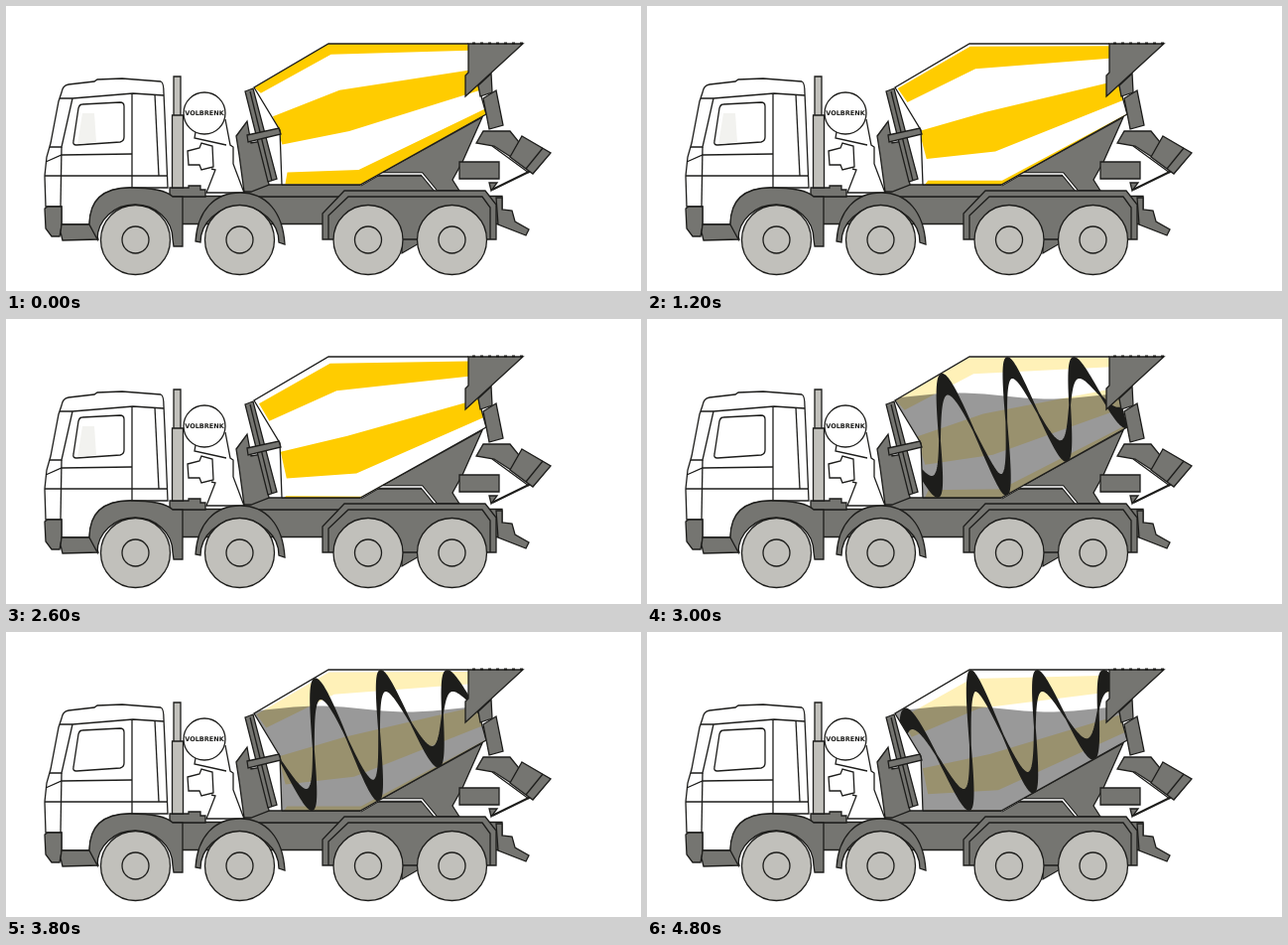
An HTML page with a canvas that plays this animation: 640 by 287 pixels, repeating every 5000 ms.

```html
<!DOCTYPE html>
<html lang="en">
<head>
<meta charset="utf-8">
<title>Concrete mixer</title>
<style>
html, body { margin: 0; width: 100%; height: 100%; overflow: hidden; background: #fff; }
canvas { display: block; }
</style>
</head>
<body>
<canvas id="stage" width="640" height="287"></canvas>
<script>
const ctx = document.getElementById('stage').getContext('2d');
const INK = '#1d1d1b', DARK = '#757571', LIGHT = '#c1c0bb', YELLOW = '#ffcc00', WHITE = '#fff';
const STEP = 200, STEPS = 25, CUT = 15;   // the drum is cut open from step CUT on
const STRIPES = 5, PITCH = 67;            // stripes around the drum, screw pitch

const lerp = (a, b, k) => a + (b - a) * k;
const clamp = (v, lo, hi) => Math.min(hi, Math.max(lo, v));

function paint(fill, width = 1.3) {
  if (fill) { ctx.fillStyle = fill; ctx.fill(); }
  if (width) { ctx.lineWidth = width; ctx.strokeStyle = INK; ctx.stroke(); }
}

function trace(points, close) {
  ctx.beginPath();
  for (let i = 0; i < points.length; i += 2) ctx.lineTo(points[i], points[i + 1]);
  if (close) ctx.closePath();
}

function poly(fill, points, width) { trace(points, true); paint(fill, width); }
function line(points, width) { trace(points, false); paint(null, width); }
function box(fill, x, y, w, h) { ctx.beginPath(); ctx.rect(x, y, w, h); paint(fill); }
function disc(x, y, r, fill) { ctx.beginPath(); ctx.arc(x, y, r, 0, 7); paint(fill); }
function shape(fill, d) {
  const p = new Path2D(d);
  ctx.fillStyle = fill;
  ctx.fill(p);
  ctx.lineWidth = 1.3;
  ctx.strokeStyle = INK;
  ctx.stroke(p);
}

// Point on the drum: u runs along its top, f goes from top (0) to bottom (1).
function drumPoint(u, f) {
  const front = u < 325, k = front ? (u - 250) / 75 : (u - 325) / 140;
  const top = front ? lerp(82, 38, k) : 38;
  const bottomX = front ? lerp(280, 359, k) : lerp(359, 486, k);
  const bottom = front ? 180 : lerp(180, 109, k);
  return [lerp(u, bottomX, f), lerp(top, bottom, f), (bottom - top) / 2];
}

const onDrum = (u, angle) => drumPoint(u, (1 - Math.cos(angle)) / 2);

// Stripes climb the visible half of the drum as it turns, slightly twisted.
function stripeEdge(angle) {
  return [250, 325, 465].map((u, i) => {
    const a = clamp(angle + (i - 1) * .07, 0, Math.PI);
    const [x, y] = onDrum(u, a);
    return [x + (i ? 0 : 11 * Math.sin(a)), y];
  });
}

function stripes(phase) {
  ctx.fillStyle = YELLOW;
  for (let n = -1; n < 3; n++) {
    const angle = 2.48 - (phase + n) * 2 * Math.PI / STRIPES;
    trace([...stripeEdge(angle), ...stripeEdge(angle + .59).reverse()].flat(), true);
    ctx.fill();
  }
}

function concrete() {
  ctx.beginPath();
  for (let x = 245; x <= 490; x += 5) ctx.lineTo(x, 77.5 - 3 * Math.cos((x - 315) * Math.PI / 90));
  ctx.lineTo(490, 190);
  ctx.lineTo(245, 190);
  ctx.globalCompositeOperation = 'multiply';
  ctx.fillStyle = '#999';
  ctx.fill();
  ctx.globalCompositeOperation = 'source-over';
}

function bladePoint(u, peak, depth) {
  const half = drumPoint(u, 0)[2];
  const swing = Math.cos((u - peak) / PITCH * 2 * Math.PI) * (1 - depth / half);
  return drumPoint(u, (1 - swing) / 2).slice(0, 2);
}

function blade(peak) {
  const outer = [], inner = [];
  for (let u = 250; u <= 466; u++) {
    outer.push(bladePoint(u, peak, 1));
    inner.unshift(bladePoint(u, peak, 21));
  }
  ctx.lineJoin = 'round';
  poly(INK, outer.concat(inner).flat(), 1.8);
  ctx.lineJoin = 'miter';
}

function drum(step) {
  const open = step >= CUT, k = step - CUT;
  const turn = .297 * k - .0045 * k * k;
  const phase = open ? (3.875 - turn) % 1 : (step % 8) / 8;

  ctx.save();
  trace([250, 82, 325, 38, 466, 38, 466, 75, 476, 80, 484, 109, 357, 180, 278, 180, 276, 125], true);
  ctx.clip();
  ctx.fillStyle = WHITE;
  ctx.fillRect(240, 30, 260, 160);
  ctx.globalAlpha = open ? .28 : 1;
  stripes(phase);
  ctx.globalAlpha = 1;
  if (open) {
    concrete();
    blade(296 + 13 * turn);
  }
  ctx.restore();
  line([278, 180, 276, 125, 250, 82, 325, 38, 466, 38]);
  line([278, 180, 357, 180, 484, 109, 476, 80]);
}

function wheel(x) {
  disc(x, 235.5, 35, LIGHT);
  disc(x, 235.5, 13.5, LIGHT);
}

function chassis() {
  box(DARK, 165, 191.5, 335, 28);
  poly(DARK, [165, 183, 184, 183, 184, 181, 196, 181, 196, 185, 201, 185, 201, 192, 165, 192]);
  poly(DARK, [240, 180, 357, 180, 372, 171, 420, 171, 433, 187, 433, 192, 240, 192]);
  poly(DARK, [494, 193, 500, 193, 500, 205, 510, 206, 513, 217, 527, 225, 524, 231, 496, 220]);
}

function rearStand() {
  poly(DARK, [357, 180, 480, 112, 460, 157, 450, 175, 457, 186, 433, 186, 420, 169, 378, 169]);
  box(DARK, 457, 157, 40, 17);
  line([357, 180, 376, 169, 419, 169, 433, 186], 3.6);
  ctx.strokeStyle = WHITE;
  ctx.lineWidth = 1.5;
  ctx.stroke();
}

function rearFender() {
  poly(DARK, [398, 215, 418, 215, 418, 238, 399, 249]);
  poly(DARK, [319, 235, 319, 209, 341, 186, 483, 186, 494, 200, 494, 235]);
  line([325, 235, 325, 211, 345, 192, 480, 192, 488, 203, 488, 235]);
}

function frontFenders() {
  shape(DARK, 'M84 220C84 195 98 183 125 183C150 183 163 187 168 192H178V242H169L168 235A38 35 0 0 0 92 235Z');
  shape(DARK, 'M191 237C193 206 210 188 236 188C262 188 279 207 281 240L275 238A39.5 36 0 0 0 196 238Z');
}

function cab(open) {
  shape(WHITE, 'M56 87Q57 80 63 79L89 76L92 74L117 73L156 76Q159 77 159 88L160 110L163 183H125C98 183 85 197 84 220H56V202H40L39 171L41 152L45 138L53 96Z');
  line([54, 93, 67, 93, 128, 88, 159, 90]);
  line([67, 93, 56, 142, 44, 142]);
  line([40, 157, 56, 150, 127, 149]);
  line([56, 142, 55, 202]);
  line([39, 171, 162, 171]);
  line([127, 89, 127, 183]);
  line([150, 89, 154, 171]);
  shape(WHITE, 'M77 99L115 97Q119 97 119 101V132Q119 136 115 137L71 140Q67 140 68 136L73 103Q74 99 77 99Z');
  if (!open) poly('#f2f2ef', [77, 108, 89, 108, 91, 137, 72, 139], 0);
  poly(DARK, [39, 204, 42, 202, 56, 202, 56, 222, 54, 232, 46, 232, 40, 224]);
  poly(DARK, [56, 220, 84, 220, 89, 222, 93, 235, 57, 236, 55, 228]);
}

function pump() {
  box(LIGHT, 169, 71, 7, 40);
  box(LIGHT, 167.5, 110, 11, 73);
  poly(WHITE, [191, 127, 190, 133, 226, 140, 229, 142, 229, 159, 240, 188, 202, 188, 211, 165, 208, 141, 222, 114], 0);
  line([191, 127, 190, 133, 222, 140]);
  line([221, 114, 226, 140, 229, 142, 229, 159, 240, 188, 202, 188, 211, 165, 207, 164]);
  poly(WHITE, [183, 146, 195, 143, 197, 138, 208, 141, 209, 162, 197, 165, 195, 160, 184, 160]);
  disc(200, 108, 21, WHITE);
  ctx.fillStyle = INK;
  ctx.font = 'bold 6.5px "DejaVu Sans", sans-serif';
  ctx.textAlign = 'center';
  ctx.textBaseline = 'middle';
  ctx.fillText('VOLBRENK', 200, 108);
}

function frontStand() {
  poly(DARK, [232, 131, 243, 116, 247, 138, 258, 136, 265, 180, 247, 187, 240, 187, 235, 150]);
  poly(DARK, [241, 86, 249, 83, 273, 174, 264, 177]);
  line([246, 86, 268, 176]);
  poly(DARK, [243, 130, 275, 123, 277, 129, 244, 137]);
}

function hopper() {
  poly(DARK, [476, 80, 489, 68, 490, 87, 478, 91]);
  poly(DARK, [481, 93, 494, 85, 501, 120, 487, 124]);
  poly(DARK, [466, 38, 521, 38, 463, 91, 463, 70, 466, 67]);
  ctx.fillStyle = INK;
  for (let x = 470; x < 520; x += 8) ctx.fillRect(x, 36.5, 3, 2);
}

function chute() {
  line([490, 141, 527, 168]);
  line([490, 185, 533, 164], 2);
  poly(DARK, [487, 178, 495, 178, 489, 186]);
  poly(DARK, [474, 138, 481, 126, 508, 126, 517, 137, 509, 152, 492, 141]);
  poly(DARK, [520, 131, 549, 148, 531, 169, 508, 152]);
  line([541, 143, 524, 164]);
}

function draw(step) {
  ctx.fillStyle = WHITE;
  ctx.fillRect(0, 0, 640, 287);
  chassis();
  rearStand();
  drum(step);
  pump();
  frontStand();
  hopper();
  chute();
  cab(step >= CUT);
  frontFenders();
  rearFender();
  [130.5, 235.5, 365, 449.5].forEach(wheel);
}

const start = performance.now();
function tick() {
  draw(Math.floor((performance.now() - start) / STEP) % STEPS);
  requestAnimationFrame(tick);
}
tick();
</script>
</body>
</html>
```
